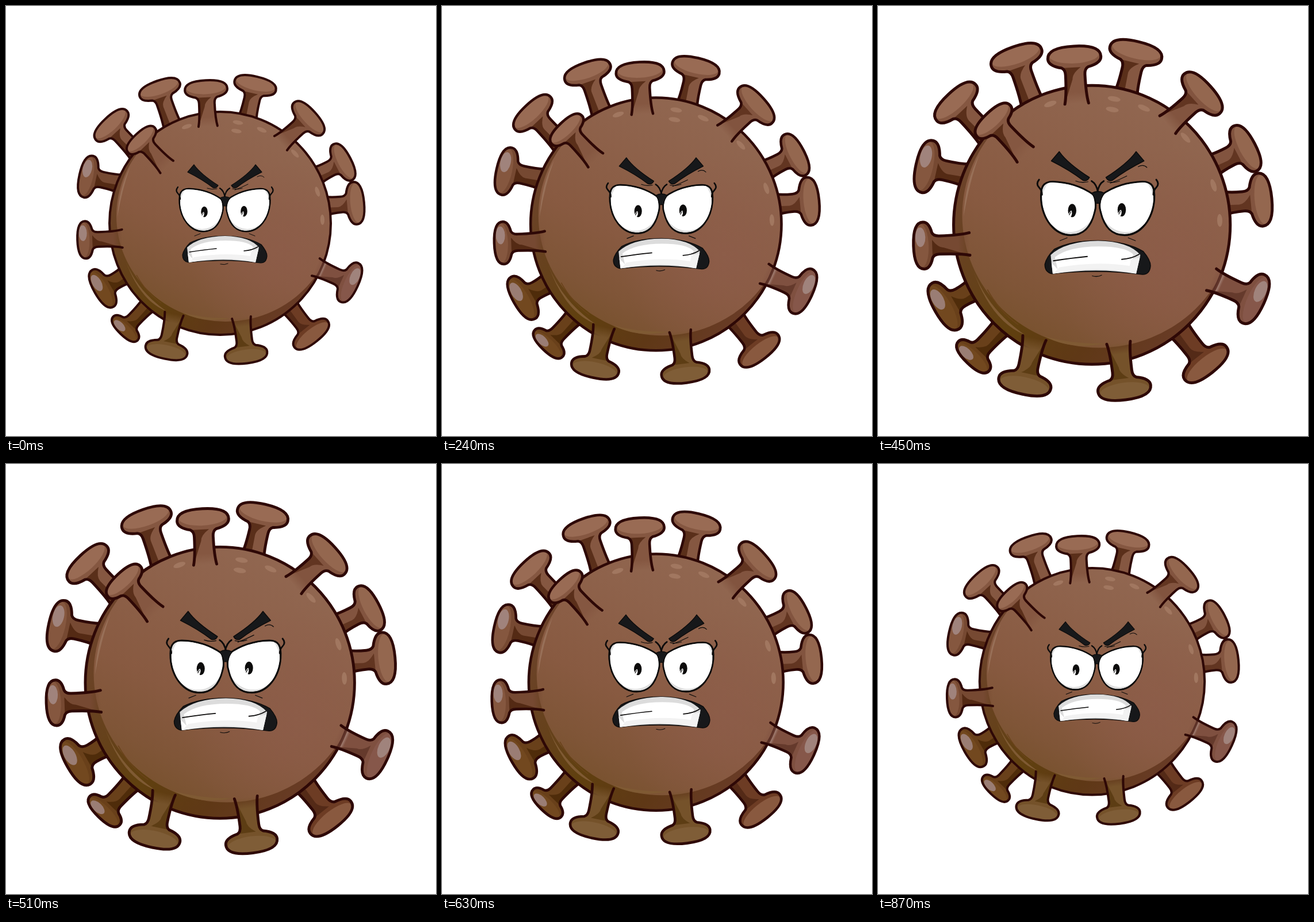
These frames come from a looping animation (748 px wide and 748 px high, 900 ms). An HTML page:

```html
<!DOCTYPE html>
<html lang="en">
<head>
<meta charset="utf-8">
<title>Angry virus</title>
<style>
  html, body { margin: 0; width: 100%; height: 100%; overflow: hidden; background: #fff; }
  svg { display: block; width: 100vw; height: 100vh; }
  .line { fill: none; stroke: #2e0806; stroke-width: 4; stroke-linecap: round; stroke-linejoin: round; }
  .ink { fill: none; stroke: #0c0b0b; stroke-width: 1.5; stroke-linecap: round; stroke-linejoin: round; }
  .thin { stroke-width: 1; }
  .bold { stroke-width: 2.3; }
  .black { fill: #17181a; stroke: #0c0b0b; stroke-width: 1.2; stroke-linejoin: round; }
</style>
</head>
<body>
<svg viewBox="0 0 748 748">
  <defs>
    <linearGradient id="skin" gradientUnits="userSpaceOnUse" x1="255" y1="545" x2="450" y2="190">
      <stop offset="0" stop-color="#75502a"/>
      <stop offset=".18" stop-color="#7f5537"/>
      <stop offset=".4" stop-color="#885a41"/>
      <stop offset=".75" stop-color="#8e624b"/>
      <stop offset="1" stop-color="#916751"/>
    </linearGradient>
    <radialGradient id="warm" gradientUnits="userSpaceOnUse" cx="480" cy="430" r="160">
      <stop offset="0" stop-color="#8d5c4a" stop-opacity=".7"/>
      <stop offset="1" stop-color="#8d5c4a" stop-opacity="0"/>
    </radialGradient>
    <linearGradient id="rim" gradientUnits="userSpaceOnUse" x1="190" y1="300" x2="520" y2="540">
      <stop offset="0" stop-color="#6d432b"/>
      <stop offset=".45" stop-color="#60400f"/>
      <stop offset=".7" stop-color="#5f3816"/>
      <stop offset="1" stop-color="#6b3c2a"/>
    </linearGradient>
    <path id="eye" d="M303 343C302 326 305 319 318 319Q350 320 374 337C377 346 377 354 375 360C370 381 360 391 343 391C321 391 305 369 303 343Z"/>
    <clipPath id="inEye"><use href="#eye"/></clipPath>
    <clipPath id="ball"><ellipse cx="372.5" cy="378" rx="193" ry="194"/></clipPath>
    <clipPath id="teeth"><path d="M315 420Q335 401 381 400Q424 401 440 420L434 446Q380 437 318 446Z"/></clipPath>
    <g id="half">
      <path class="black" d="M316 289L327 276Q338 292 369 312Q366 318 360 316Q342 302 316 289Z"/>
      <use href="#eye" fill="#0c0b0b" stroke="#0c0b0b" stroke-width="5"/>
      <g clip-path="url(#inEye)">
        <use href="#eye" fill="#dedede"/>
        <ellipse cx="341" cy="346" rx="38" ry="42" fill="#fff"/>
      </g>
      <path class="ink bold" d="M372 317Q379 321 381 333M299 315Q294 321 299 326Q303 330 303 336"/>
      <path class="ink thin" d="M350 317Q358 320 367 318M328 400L338 396"/>
    </g>
    <g id="pupil">
      <ellipse rx="5.8" ry="9.2" fill="#0c0b0b"/>
      <path d="M-6 8Q-4 1 -1 0Q1 4 -2 9Z" fill="#fff"/>
      <path class="ink thin" d="M-4 6L-2 2"/>
    </g>
  </defs>
  <g id="virus">
    <g id="back"></g>

    <g clip-path="url(#ball)">
      <rect x="175" y="180" width="400" height="400" fill="url(#rim)"/>
      <ellipse cx="382" cy="365" rx="190" ry="184" fill="url(#skin)"/>
      <ellipse cx="382" cy="365" rx="190" ry="184" fill="url(#warm)"/>
      <path d="M207 440Q226 494 279 531Q232 512 207 440ZM306 533Q345 544 390 543Q345 553 306 533Z" fill="#7f5a33"/>
      <path d="M216 280Q196 318 194 366Q202 318 216 280Z" fill="#987058"/>
      <path d="M227 468Q245 500 270 517" fill="none" stroke="#694219" stroke-width="1.4"/>
      <g id="flecks" fill="#a17760"></g>
    </g>
    <ellipse class="line" cx="372.5" cy="378" rx="192.5" ry="194"/>

    <g id="front"></g>

    <use href="#half"/>
    <use href="#half" transform="translate(761 0) scale(-1 1)"/>
    <use href="#pupil" x="345" y="358"/>
    <use href="#pupil" x="414" y="357"/>
    <path class="black" d="M372 334Q381 329 390 334Q385 340 384 348H378Q377 340 372 334Z"/>
    <path class="ink thin" d="M398 320Q409 316 421 310M437 297Q444 293 449 298M373 449Q380 451 386 448"/>

    <path class="black bold" d="M307 433Q309 423 320 412Q342 400 381 400Q421 401 444 415Q454 427 454 435Q453 447 443 447Q380 439 317 446Q307 444 307 433Z"/>
    <g clip-path="url(#teeth)">
      <rect x="306" y="395" width="150" height="60" fill="#dcdcdc"/>
      <path d="M321 423Q340 408 382 408Q419 408 430 419L427 438Q380 432 325 441Z" fill="#fff"/>
      <path d="M310 424L325 440L320 448H310Z" fill="#fff"/>
      <path d="M318 447Q380 433 437 447L440 423L427 426L425 435Q380 428 327 437Z" fill="#f2f2f2"/>
    </g>
    <path class="ink" d="M319 428Q345 424 366 422M414 426Q428 425 438 419"/>
  </g>
</svg>
<script>
const LOOP = 900, STEP = 30, GROW = 0.25;
const MID = [374, 367], BODY = [372.5, 378];
const CAP = 37, DEPTH = 16, STEM = 13.5;
const $ = id => document.getElementById(id);

const tones = {
  top: { face: '#996b54', stem: '#855741', dark: '#5a2f1a' },
  right: { face: '#94674f', stem: '#82543f', dark: '#623521' },
  low: { face: '#89593f', stem: '#6d3c24', dark: '#542a17' },
  pink: { face: '#86574a', stem: '#7f5040', dark: '#653a2c', shine: '#a0837c' },
  left: { face: '#85573f', stem: '#764932', dark: '#542a14', shine: '#a0837c' },
  dusk: { face: '#72481f', stem: '#69401a', dark: '#4f2c0a', shine: '#9a7d74' },
  olive: { face: '#7f5d37', stem: '#75522a', dark: '#5d3d14' }
};

// bearing in degrees from the top, distance from the body's middle, extra lean, tone, size
const backSpikes = [
  [-24.3, 255, 5, 'top'],
  [14.3, 247, -1, 'top'],
  [63.5, 238, -1, 'right', 0.95],
  [81.5, 237, 3, 'right'],
  [140.6, 249, 1, 'low'],
  [222, 246, 2, 'dusk', 0.8],
  [241, 233, -1, 'dusk'],
  [289.5, 243, -7, 'left'],
  [-48, 254, 5, 'top']
];
const frontSpikes = [
  [-6, 234, 3, 'top'],
  [40, 238, 8, 'right'],
  [114.6, 247, 0, 'pink'],
  [168.8, 232, 4, 'olive'],
  [203, 239, -11, 'olive'],
  [263, 236, 5, 'left', 0.88],
  [-43.4, 199, 0, 'top', 0.86]
];

// moves to a bearing and distance, then turns to face outwards
const place = (at, out, lean = 0) =>
  `translate(${BODY}) rotate(${at}) translate(0 ${-out}) rotate(${lean})`;

function spike([at, out, lean, tone, size = 1], i, front) {
  const { face, stem, dark, shine } = tones[tone];
  const L = CAP * size, T = DEPTH * size, w = STEM * Math.sqrt(size), b = w + 3;
  const S = front ? 64 : out - 185;
  const side = at > 50 && at < 180 ? 1 : -1;
  const neck = T + 8, lip = w + 5, under = T * 0.85;
  const id = (front ? 'front' : 'back') + 'Stem' + i;
  const outline = `M${-b} ${S}Q${-w} ${S * 0.8} ${-w} ${neck}Q${-w} ${T} ${-lip} ${under}` +
    `Q${-L} ${T * 0.6} ${-L} 0C${-L} ${-T * 0.75} ${-L * 0.55} ${-T} 0 ${-T}` +
    `C${L * 0.55} ${-T} ${L} ${-T * 0.75} ${L} 0Q${L} ${T * 0.6} ${lip} ${under}` +
    `Q${w} ${T} ${w} ${neck}Q${w} ${S * 0.8} ${b} ${S}`;
  const shade = `M${side * b} ${S}Q${side * w} ${S * 0.8} ${side * w} ${neck}` +
    `Q${side * w} ${T} ${side * lip} ${under}L${-side * w * 0.6} ${under}` +
    `Q${side * w * 0.3} ${T + 6} ${side * w * 0.3} ${neck + 6}` +
    `L${side * (front ? b : w * 0.2)} ${S}Z`;
  const glint = shine
    ? `<ellipse cx="${-side * L * 0.36}" cy="${-T * 0.3}" rx="${L * 0.42}" ry="${T * 0.5}" fill="${shine}"/>`
    : '';
  return `<g transform="${place(at, out, lean)}">` +
    `<linearGradient id="${id}" gradientUnits="userSpaceOnUse" x1="0" y1="0" x2="0" y2="${S}">` +
    `<stop offset=".75" stop-color="${stem}"/>` +
    `<stop offset="1" stop-color="${stem}" stop-opacity="${front ? 0 : 1}"/></linearGradient>` +
    `<path d="${outline}" fill="url(#${id})"/><path d="${shade}" fill="${dark}"/>` +
    `<ellipse cy="${-T * 0.22}" rx="${L * 0.93}" ry="${T * 0.72}" fill="${face}"/>${glint}` +
    `<path class="line" d="${outline}"/></g>`;
}

const fleck = (at, out) => `<ellipse rx="9" ry="3.6" transform="${place(at, out)}"/>`;

$('back').innerHTML = backSpikes.map((s, i) => spike(s, i, false)).join('');
$('front').innerHTML = frontSpikes.map((s, i) => spike(s, i, true)).join('');
$('flecks').innerHTML = [-19, 10, 24, 47, 72, 88].map(at => fleck(at, 178)).join('') + fleck(10, 163);

function draw(ms) {
  const t = Math.floor((ms % LOOP) / STEP) * STEP;
  const k = 1 + GROW * (1 - Math.abs(1 - 2 * t / LOOP));
  $('virus').setAttribute('transform',
    `translate(${MID}) scale(${k}) translate(${MID.map(v => -v)})`);
}

let start;
function tick(now) {
  start ??= now;
  draw(now - start);
  requestAnimationFrame(tick);
}
draw(0);
requestAnimationFrame(tick);
</script>
</body>
</html>
```
